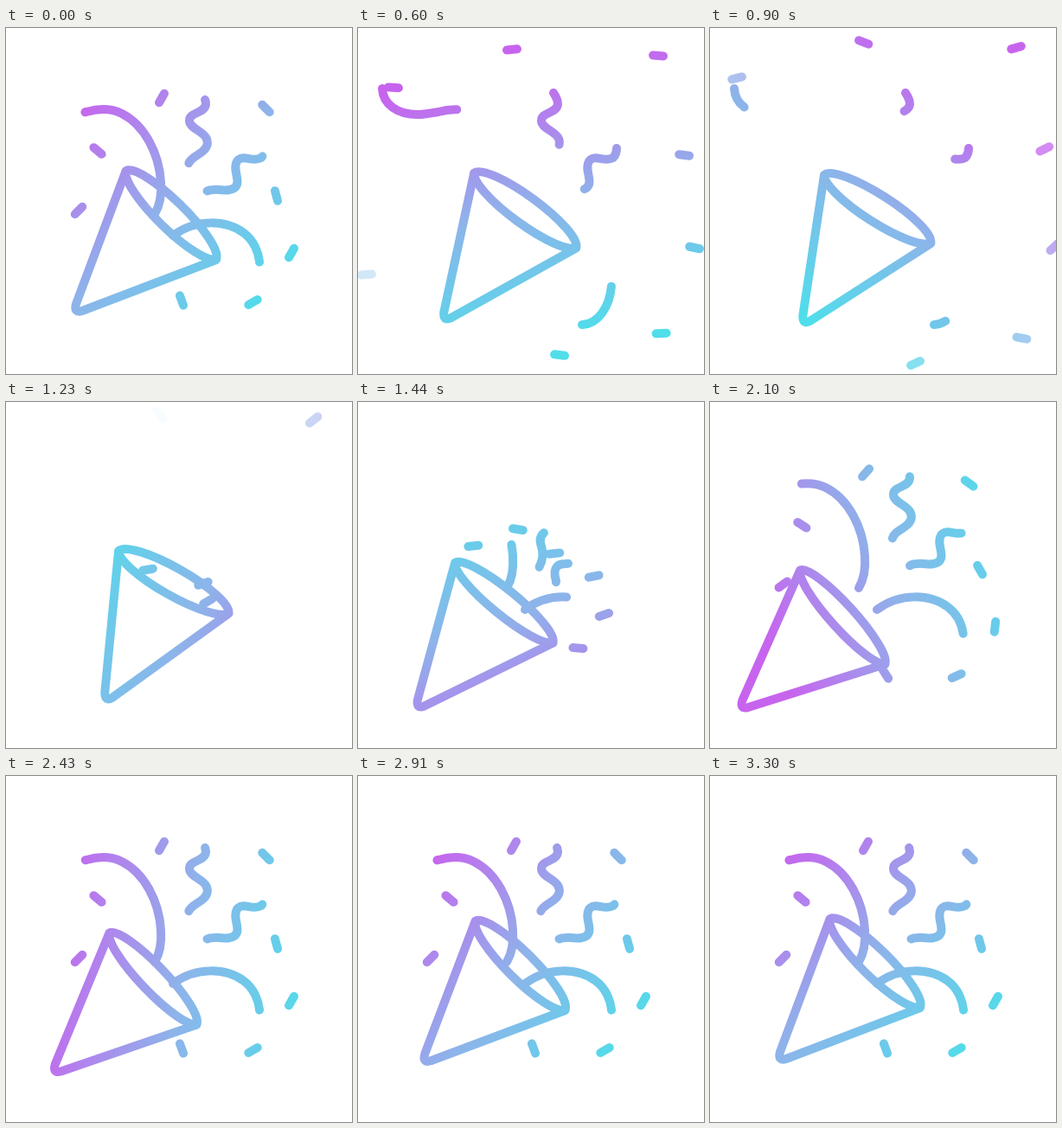
Animation of 400x400 px, one loop 5330 ms. Source, as an HTML page with a canvas:

```html
<!DOCTYPE html>
<html lang="en">
<head>
<meta charset="utf-8">
<title>Party popper</title>
<style>
html, body { margin: 0; width: 100%; height: 100%; overflow: hidden; background: #fff; }
canvas { display: block; width: 400px; height: 400px; }
</style>
</head>
<body>
<canvas id="stage"></canvas>
<script>
const LOOP = 5330, STEP = 30, END = 3300;
const POP = 1230, RECOILED = 1650, LANDED = 2400;
const canvas = document.getElementById('stage');
const ctx = canvas.getContext('2d');
const ratio = window.devicePixelRatio || 1;
canvas.width = canvas.height = 400 * ratio;

const span = (t, a, b) => Math.max(0, Math.min(1, (t - a) / (b - a)));
const easeOut = (u, n) => 1 - Math.pow(1 - u, n);
const easeBoth = u => (1 - Math.cos(Math.PI * u)) / 2;
const mix = (a, b, u) => a + (b - a) * u;
const rad = deg => deg * Math.PI / 180;

// Cone poses: tip shift x, tip shift y, turn, half depth of the rim
const REST = [0, 0, 0, 17], WOUND = [35, 16, -15, 17], RECOIL = [-58, 34, 4.5, 14];
const TIP = [83, 326], MOUTH = [190, 217];

function conePose(t) {
  const wind = easeOut(span(t, 0, POP), 1.2);
  const kick = easeBoth(span(t, POP, RECOILED));
  const settle = easeBoth(easeOut(span(t, RECOILED, END), 1.25));
  return REST.map((r, i) => mix(mix(mix(r, WOUND[i], wind), RECOIL[i], kick), r, settle));
}

// One full turn of the gradient: speeding up to the pop, slowing down after it
function paint(t) {
  const k = Math.pow(span(t, 0, 1290), 2.2) / 2 + easeOut(span(t, 1290, END), 1.95) / 2;
  const a = rad(45 + 360 * k), mid = 200 + 28 * Math.sin(Math.PI * k);
  const dx = 160 * Math.cos(a), dy = 160 * Math.sin(a);
  const g = ctx.createLinearGradient(mid - dx, mid - dy, mid + dx, mid + dy);
  ['#c764ee', '#8db4ea', '#4fdeea'].forEach((c, i) => g.addColorStop(i / 2, c));
  return g;
}

const bit = (x, y, angle, fx, fy, life) => ({ x, y, angle, fx, fy, life });
const BITS = [
  bit(106, 142, 40, -65, -73, 1050),
  bit(84, 211, -45, -74, 74, 670),
  bit(180, 81, -60, -2, -56, 1240),
  bit(300.5, 93, 45, 46.5, -61, 1330),
  bit(312.5, 194, 75, 64.5, -47, 1050),
  bit(330, 260, 120, 59, -6, 1050),
  bit(285.5, 317, -30, 65, 36, 1050),
  bit(203, 315, 70, 30, 63, 1050)
];

// lo, hi: resting part of the path; leave, grow: pace of going and coming back
function streamer(d, lo, hi, leave, grow) {
  const el = document.createElementNS('http://www.w3.org/2000/svg', 'path');
  el.setAttribute('d', d);
  return { path: new Path2D(d), length: el.getTotalLength(), lo, hi, leave, grow };
}
const STREAMERS = [
  streamer('M172 215C178 205 180 192 179 178C177 145 160 112 134 99C122 93 107 93 93 97C82 99 74 100 69 100C45 100 29 88 28 70',
    0, 0.69, 1, 2.2),
  streamer('M193 240C220 220 255 222 275 237C287 246 292 260 293 270C294 282 294 290 293 298C291 322 278 342 259 343',
    0, 0.587, 0.65, 3.3),
  streamer('M196 212C206 196 218 184 212 167C206 151 221 149 228 142C235 136 234 128 228 123C221 117 212 114 212 107C212 97 230 99 231 88C231 83 228 78 226 75',
    0.355, 0.945, 2.5, 3.4),
  streamer('M222 216C226 214 229 212 229 207C224 190 232 187 240 187C250 186 256 190 264 185C273 178 261 164 267 154C274 145 285 156 295 150C298 147 299 143 299 139',
    0.235, 0.925, 2.5, 2.6)
];

function drawBit(x, y, angle, alpha) {
  const dx = Math.cos(rad(angle)) * 6, dy = Math.sin(rad(angle)) * 6;
  ctx.globalAlpha = alpha;
  ctx.beginPath();
  ctx.moveTo(x - dx, y - dy);
  ctx.lineTo(x + dx, y + dy);
  ctx.stroke();
  ctx.globalAlpha = 1;
}

function drawBits(t) {
  for (const b of BITS) {
    if (t < b.life) {
      const k = easeOut(span(t, 0, 1300), 3) / 0.843;
      drawBit(b.x + b.fx * k, b.y + b.fy * k, b.angle * (1 - 0.9 * t / 600),
        1 - span(t, b.life - 200, b.life));
    }
    const launch = Math.max(POP - 120, b.life);
    if (t >= POP && t > launch) {
      const k = easeOut(span(t, launch, LANDED), 3.8);
      const left = 1 - easeBoth(span(t, POP, LANDED));
      drawBit(mix(MOUTH[0], b.x, k), mix(MOUTH[1], b.y, k), b.angle * (1 - 1.25 * left), 1);
    }
  }
}

function drawStreamer(s, t) {
  const k = easeOut(span(t, POP + 30, LANDED + 100), s.grow);
  let from = s.lo * k, to = s.hi * k;
  if (t < POP) {
    from = mix(s.lo, 1, Math.pow(span(t, 0, 1000), s.leave));
    to = mix(s.hi, 1, easeOut(span(t, 0, 580), 2));
  }
  if (to - from < 0.005) return;
  ctx.setLineDash([(to - from) * s.length, 2000]);
  ctx.lineDashOffset = -from * s.length;
  ctx.stroke(s.path);
  ctx.setLineDash([]);
}

function draw(t) {
  ctx.setTransform(ratio, 0, 0, ratio, 0, 0);
  ctx.fillStyle = '#fff';
  ctx.fillRect(0, 0, 400, 400);
  ctx.lineWidth = 10;
  ctx.lineCap = ctx.lineJoin = 'round';
  ctx.strokeStyle = paint(t);

  const [x, y, turn, depth] = conePose(t);
  const matrix = new DOMMatrix()
    .translate(TIP[0] + x, TIP[1] + y).rotate(turn).translate(-TIP[0], -TIP[1]);
  const place = d => {
    const p = new Path2D();
    p.addPath(new Path2D(d), matrix);
    return p;
  };
  const arc = `A73 ${depth} 44.5 0 1 `;

  ctx.save();
  if (t >= POP && t < 1500) {
    // the front of the cone hides what is still inside
    const open = place(`M139 165L80 328L243 267${arc}139 165Z`);
    open.rect(-100, -100, 600, 600);
    ctx.clip(open, 'evenodd');
  }
  drawBits(t);
  STREAMERS.forEach(s => drawStreamer(s, t));
  ctx.restore();

  ctx.stroke(place('M138.5 165.5L81 319Q78 330 88 327L243 268'));
  ctx.stroke(place(`M243 267${arc}139 165${arc}243 267Z`));
}

function tick() {
  const t = performance.now() % LOOP;
  draw(Math.min(END, Math.floor(t / STEP) * STEP));
  requestAnimationFrame(tick);
}
tick();
</script>
</body>
</html>
```
